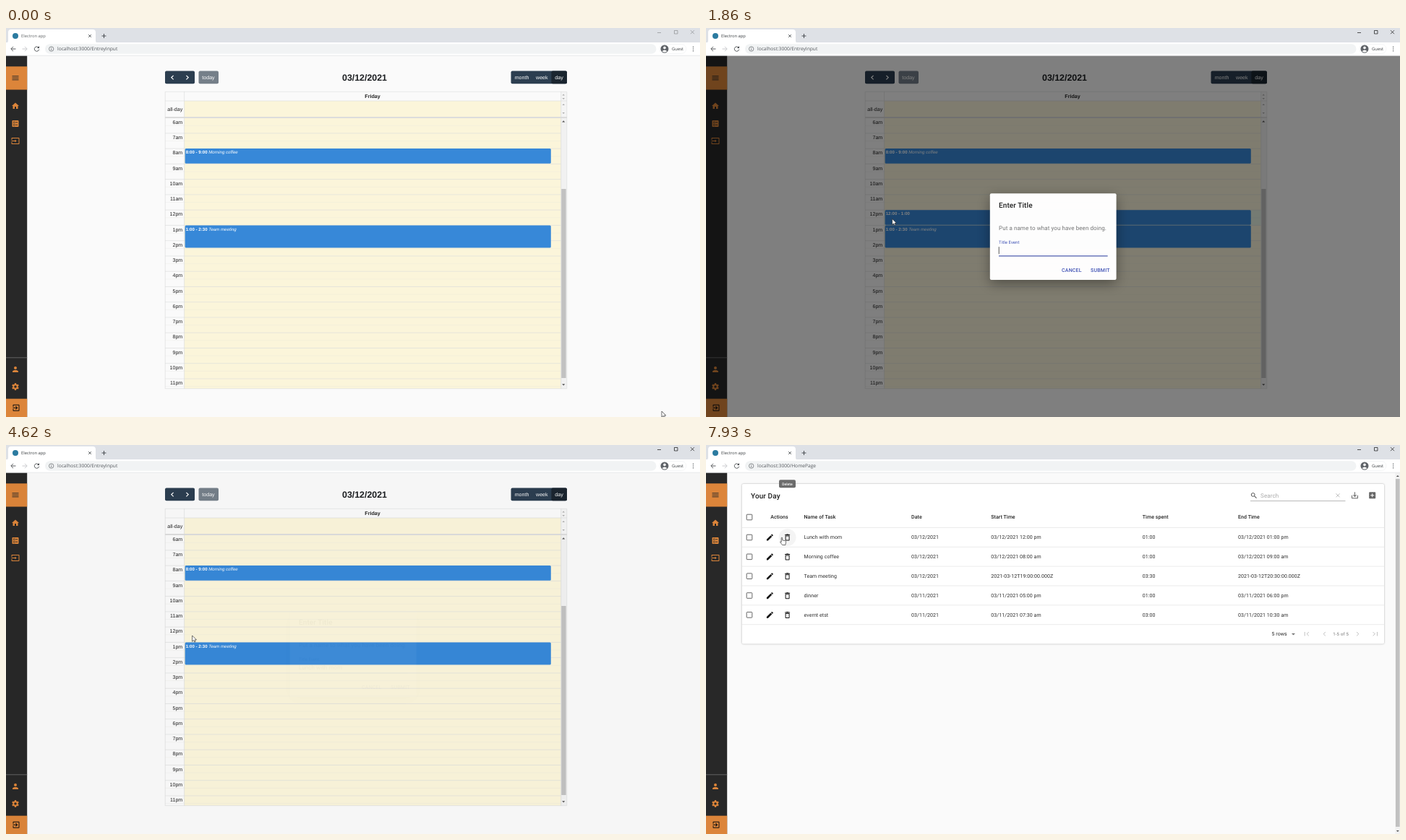
An HTML page that plays this animation: 960x539 px, repeating every 8 s.

```html
<!DOCTYPE html>
<html lang="en">
<head>
<meta charset="utf-8">
<title>Electron app</title>
<style>
html, body { margin: 0; width: 100%; height: 100%; overflow: hidden; background: #fafafa; }
svg { display: block; width: 100%; height: 100%; }
text { text-rendering: geometricPrecision; }
.ui { font-family: "Open Sans", "Noto Sans", sans-serif; }
.cal { font-family: "Liberation Sans", Arial, sans-serif; }
.mui { font-family: Roboto, sans-serif; letter-spacing: .0105em; }
.med { font-weight: 500; }
.bold { font-weight: 700; }
.btn { letter-spacing: .0286em; }
.cap { letter-spacing: .0333em; }
.paper { filter: drop-shadow(0 .8px .9px rgba(0,0,0,.32)); }
.modal { filter: drop-shadow(0 5px 9px rgba(0,0,0,.38)); }
</style>
</head>
<body>
<svg id="stage" viewBox="0 0 960 539" preserveAspectRatio="none"></svg>
<script>
const LOOP = 8000;
const DARK = '#212121', GREY = '#757575', PALE = '#bdbdbd', ORANGE = '#dc853a', INDIGO = '#3f51b5';

const ICONS = {
  menu: 'M3 18h18v-2H3v2zm0-5h18v-2H3v2zm0-7v2h18V6H3z',
  home: 'M10 20v-6h4v6h5v-8h3L12 3 2 12h3v8z',
  ballot: 'M13 9.5h5v-2h-5v2zm0 7h5v-2h-5v2zm6 4.5H5c-1.1 0-2-.9-2-2V5c0-1.1.9-2 2-2h14c1.1 0 2 .9 2 2v14c0 1.1-.9 2-2 2zM6 11h5V6H6v5zm1-4h3v3H7V7zM6 18h5v-5H6v5zm1-4h3v3H7v-3z',
  input: 'M21 3H3c-1.1 0-2 .9-2 2v4h2V5h18v14H3v-4H1v4c0 1.1.9 2 2 2h18c1.1 0 2-.9 2-2V5c0-1.1-.9-2-2-2zM11 16l4-4-4-4v3H1v2h10v3z',
  person: 'M12 12a4 4 0 1 0 0-8 4 4 0 0 0 0 8zm0 2c-2.7 0-8 1.3-8 4v2h16v-2c0-2.7-5.3-4-8-4z',
  exit: 'M10.1 15.6L11.5 17l5-5-5-5-1.4 1.4L12.7 11H3v2h9.7l-2.6 2.6zM19 3H5c-1.1 0-2 .9-2 2v4h2V5h14v14H5v-4H3v4c0 1.1.9 2 2 2h14c1.1 0 2-.9 2-2V5c0-1.1-.9-2-2-2z',
  edit: 'M3 17.2V21h3.8L17.8 9.9l-3.7-3.7L3 17.2zM20.7 7c.4-.4.4-1 0-1.4l-2.3-2.3c-.4-.4-1-.4-1.4 0l-1.9 1.8 3.8 3.8L20.7 7z',
  trash: 'M6 19c0 1.1.9 2 2 2h8c1.1 0 2-.9 2-2V7H6v12zM8 9h8v10H8V9zm7.5-5l-1-1h-5l-1 1H5v2h14V4z',
  save: 'M19 12v7H5v-7H3v7c0 1.1.9 2 2 2h14c1.1 0 2-.9 2-2v-7h-2zm-6 .7l2.6-2.6L17 11.5l-5 5-5-5 1.4-1.4 2.6 2.6V3h2z',
  add: 'M19 3H5c-1.1 0-2 .9-2 2v14c0 1.1.9 2 2 2h14c1.1 0 2-.9 2-2V5c0-1.1-.9-2-2-2zm-2 10h-4v4h-2v-4H7v-2h4V7h2v4h4v2z'
};

// markup helpers; text and icons are placed by their vertical centre
const rect = (x, y, r, b, fill, rx = 0, more = '') =>
  `<rect x="${x}" y="${y}" width="${r - x}" height="${b - y}" rx="${rx}" fill="${fill}" ${more}/>`;
const text = (x, y, s, size, cls, fill = DARK, more = '') =>
  `<text x="${x}" y="${y + size * .36}" font-size="${size}" class="${cls}" fill="${fill}" ${more}>${s}</text>`;
const path = (d, color, w = 1, more = '') =>
  `<path d="${d}" fill="none" stroke="${color}" stroke-width="${w}" ${more}/>`;
const shape = (d, fill) => `<path d="${d}" fill="${fill}"/>`;
const circle = (x, y, r, fill, more = '') => `<circle cx="${x}" cy="${y}" r="${r}" fill="${fill}" ${more}/>`;
const icon = (name, x, y, fill, s = .5) =>
  `<path transform="translate(${x - 12 * s} ${y - 12 * s}) scale(${s})" fill="${fill}" fill-rule="evenodd" d="${ICONS[name]}"/>`;
const group = (id, body, more = '') => `<g id="${id}" ${more}>${body}</g>`;
const hline = (x, r, y, color, w = .6, more = '') => path(`M${x} ${y}H${r}`, color, w, more);
const vline = (x, y, b, color, w = .6) => path(`M${x} ${y}V${b}`, color, w);
const cross = (x, y, r, color, w) => path(`M${x - r} ${y - r}l${2 * r} ${2 * r}m0 ${-2 * r}l${-2 * r} ${2 * r}`, color, w);
const tri = (x, y, w, h, fill) => shape(`M${x - w} ${y - h / 2}h${2 * w}l${-w} ${h}z`, fill);
const chevron = (x, y, r, dir, color, w) => path(`M${x - dir * r / 2} ${y - r}l${dir * r} ${r}l${-dir * r} ${r}`, color, w);
const MID = 'text-anchor="middle"', END = 'text-anchor="end"';

function browser() {
  return rect(0, 0, 960, 20.5, '#dee1e6') +
    shape('M0 20.5q3 0 3-3V6q0-4 4-4H120q4 0 4 4v11.500q0 3 3 3z', '#fff') +
    circle(13, 11, 4, '#2b7ba0') + cross(116, 11, 1.9, '#3c4043', .8) +
    path('M132.500 11h6m-3-3v6', '#3c4043', .9) +
    group('title', text(21, 11, 'Electron app', 5.8, 'ui', '#3c4043')) +
    group('wbtns', path('M901 6.500h5M924.500 3.500h4.500v4.500h-4.500z', '#111', .7) + cross(949.5, 5.7, 2.5, '#111', .7)) +
    rect(0, 20, 960, 38.2, '#fff') + hline(0, 960, 38.2, '#dadce0') +
    path('M13.500 29H7m3-3.200L6.800 29l3.200 3.200', '#4a4d51', .9) +
    path('M22.500 29H29m-3-3.200l3.200 3.200-3.200 3.200', '#c4c6c9', .9) +
    path('M45 27a3.200 3.200 0 1 0 .7 2.600', '#4a4d51', .9) + shape('M46 25v3h-3z', '#4a4d51') +
    rect(54, 22.3, 899.5, 35.7, '#f1f3f4', 6.7) +
    circle(62.7, 29, 3.2, 'none', 'stroke="#5f6368" stroke-width=".7"') +
    path('M62.700 28.500v2.300m0-4v.8', '#5f6368', .8) +
    text(71, 29, '', 6.65, 'ui', '#55595e', 'id="url"') +
    rect(904, 22.5, 941, 35.5, '#fff', 6.5, 'stroke="#eceef0" stroke-width=".6"') +
    circle(911, 29, 5.5, '#5f6368') + circle(911, 27.4, 1.8, '#fff') + shape('M907.500 32.200q3.500-3.600 7 0q-3.500 2.500-7 0z', '#fff') +
    text(921, 29, 'Guest', 5.9, 'ui', '#3c4043') +
    [26.3, 29, 31.7].map(y => circle(950.6, y, .75, '#5f6368')).join('');
}

function gear(x, y) {
  let s = circle(x, y, 2.7, 'none', `stroke="${ORANGE}" stroke-width="1.9"`);
  for (let i = 0; i < 6; i++)
    s += `<rect x="${x - 1.1}" y="${y - 4.9}" width="2.2" height="2" fill="${ORANGE}" transform="rotate(${i * 60} ${x} ${y})"/>`;
  return s;
}

function sidebar() {
  return rect(0, 38.4, 29.2, 539, '#282828') + rect(0, 53.3, 29.2, 85.5, ORANGE) +
    icon('menu', 13, 69.3, '#2b2b2b') +
    [['home', 108], ['ballot', 132.4], ['input', 156.6], ['person', 473]].map(([n, y]) => icon(n, 13, y, ORANGE)).join('') +
    gear(13, 497) + hline(0, 29.2, 456.8, '#6a6a6a', .9) +
    rect(0, 513.7, 29.2, 539, ORANGE) + icon('exit', 14, 526.3, '#111');
}

// calendar geometry
const hourY = h => 124.6 + (h - 6) * 21.26;
const label = h => (h > 12 ? h - 12 : h) + (h < 12 ? 'am' : 'pm');
const eventBox = (id, from, to, time, name) => group(id,
  rect(247.6, hourY(from), 753.8, hourY(to) - .7, '#3788d8', 1.5) +
  text(248.7, hourY(from) + 4.9, `<tspan font-weight="700">${time}</tspan> <tspan font-style="italic">${name}</tspan>`, 6.12, 'cal', '#fff'));

function calendar() {
  const line = '#d9dadb', today = '#fbf5da', navy = '#2c3e50';
  let s = rect(29.2, 38.5, 960, 539, '#fafafa') +
    rect(220, 59.5, 261, 77.3, navy, 2) + chevron(230.2, 68.6, 2.8, -1, '#fff', 1.2) + chevron(250.8, 68.6, 2.8, 1, '#fff', 1.2) +
    rect(266.5, 59.5, 294, 77.3, '#757f89', 2) + text(280, 68.5, 'today', 7.1, 'cal', '#fff', MID) +
    text(496, 68.6, '03/12/2021', 12.4, 'cal bold', '#1c1f22', MID) +
    rect(698.5, 59.5, 776, 77.3, navy, 2) + rect(754.4, 59.5, 776, 77.3, '#1a252f', 2) +
    [['month', 713.5], ['week', 741.3], ['day', 765]].map(([w, x]) => text(x, 68.5, w, 7.1, 'cal', '#fff', MID)).join('') +
    text(507, 94.7, 'Friday', 7.1, 'cal bold', DARK, MID) +
    rect(246.6, 101, 767.7, 123.2, today) + rect(246.6, 125, 767.7, 499.7, today) +
    text(244.2, 112.3, 'all-day', 7.1, 'cal', DARK, END);
  for (let h = 6; h < 24; h++) {
    s += text(244.2, hourY(h) + 5.6, label(h), 7.05, 'cal', DARK, END);
    if (h > 6) s += hline(220, 767.7, hourY(h), line);
    s += hline(220, 767.7, hourY(h + .5), '#dedfd9', .5, 'stroke-dasharray=".5 .5"');
  }
  s += rect(220, 123, 776, 125, '#dcdcdc') +
    rect(767.9, 88.3, 775.5, 123, '#f4f4f4') + rect(767.9, 125, 775.5, 499.6, '#f1f1f1') + rect(768.2, 223, 774.6, 485, '#c1c1c1') +
    tri(771.2, 92.5, 1.7, -1.8, '#aaa') + tri(771.2, 98, 1.7, 1.8, '#aaa') +
    tri(771.2, 106, 1.7, -1.8, '#aaa') + tri(771.2, 118, 1.7, 1.8, '#aaa') +
    tri(771.2, 129.3, 2, -2.2, '#505050') + tri(771.2, 494.3, 2, 2.2, '#505050') +
    path('M220.200 88.300H775.700V499.700H220.200zM220 101H776M246.600 88V500M767.700 88V500', line, .6) +
    group('shade', '<rect id="shadeBox" x="246.6" y="252.2" width="521" fill="#bce8f1" fill-opacity=".32"/>') +
    eventBox('coffee', 8, 9, '8:00 - 9:00', 'Morning coffee') +
    eventBox('half', 12, 12.5, '12:00 - 12:30', '') +
    eventBox('pick', 12, 13, '12:00 - 1:00', '') +
    eventBox('lunch', 12, 13, '12:00 - 1:00', 'Lunch with mom') +
    eventBox('team', 13, 14.5, '1:00 - 2:30', 'Team meeting');
  return s;
}

const checkbox = y => rect(56.2, y - 3.8, 63.8, y + 3.8, 'none', .7, 'stroke="#666" stroke-width="1"');

// the task table: dx and dy shift the controls when a scrollbar takes room
function table(id, right, bottom, cols, body, count) {
  const dx = right - 946.5, fy = bottom - 14;
  const names = ['Actions', 'Name of Task', 'Date', 'Start Time', 'Time spent', 'End Time'];
  return group(id,
    rect(49.8, 54, right, bottom, '#fff', 2, 'class="paper"') +
    text(62, 70, 'Your Day', 10, 'mui med') +
    circle(765.2 + dx, 68.9, 2.4, 'none', 'stroke="#555" stroke-width="1"') + path(`M${767 + dx} 70.700l3 3`, '#555', 1.1) +
    text(775.6 + dx, 69.8, 'Search', 8, 'mui', '#a9a9a9') + hline(761.5 + dx, 893 + dx, 77.5, '#8c8c8c', .6) +
    cross(882.5 + dx, 69.8, 2.5, '#b5b5b5', .9) +
    icon('save', 906 + dx, 69.8, '#666') + icon('add', 930.2 + dx, 69.8, '#666') +
    checkbox(100) + cols.map((x, i) => text(x, 99.8, names[i], 7, 'mui med')).join('') +
    hline(49.8, right, 114.5, '#dedede') + body +
    text(791 + dx, fy - .4, '5 rows', 7, 'mui') + tri(821 + dx, fy + .7, 2.5, 2.5, GREY) +
    vline(836.7 + dx, fy - 2.5, fy + 3.1, PALE, .9) + chevron(841 + dx, fy + .3, 2.6, -1, PALE, 1) +
    chevron(864 + dx, fy + .3, 2.6, -1, PALE, 1) + text(875.7 + dx, fy, count, 6, 'mui cap', GREY) +
    chevron(910 + dx, fy + .3, 2.6, 1, PALE, 1) +
    chevron(932.5 + dx, fy + .3, 2.6, 1, PALE, 1) + vline(937 + dx, fy - 2.5, fy + 3.1, PALE, .9));
}

const TASKS = [
  ['Lunch with mom', '03/12/2021', '03/12/2021 12:00 pm', '01:00', '03/12/2021 01:00 pm'],
  ['Morning coffee', '03/12/2021', '03/12/2021 08:00 am', '01:00', '03/12/2021 09:00 am'],
  ['Team meeting', '03/12/2021', '2021-03-12T19:00:00.000Z', '03:30', '2021-03-12T20:30:00.000Z'],
  ['dinner', '03/11/2021', '03/11/2021 05:00 pm', '01:00', '03/11/2021 06:00 pm'],
  ['evernt etst', '03/11/2021', '03/11/2021 07:30 am', '03:00', '03/11/2021 10:30 am']
];

function home() {
  const cols = [89.2, 135.5, 284, 394.2, 603.8, 736];
  const rows = circle(112.6, 128, 12, '#000', 'id="binHover"') + TASKS.map((task, i) => {
    const y = 127.8 + i * 26.85;
    return checkbox(y + .2) + icon('edit', 88.4, y + .3, '#161616') + icon('trash', 112.6, y + .3, '#161616') +
      task.map((s, k) => text(cols[k + 1], y - .2, s, 7, 'mui', '#2c2c2c')).join('') +
      hline(49.8, 938, y + 13.5, '#dedede');
  }).join('');
  return rect(29.2, 38.5, 960, 539, '#fafafa') +
    table('empty', 946.5, 265.5, [84.8, 127.3, 292.5, 458, 623.3, 789],
      text(498, 176, 'No records to display', 7, 'mui', '#2c2c2c', MID) + hline(49.8, 946.5, 238.5, '#dedede'), '0-0 of 0') +
    group('full', table('rows', 938, 275.5, cols, rows, '1-5 of 5') +
      rect(953.3, 38.5, 960, 539, '#f1f1f1') + rect(954, 47, 959.6, 529, '#c1c1c1') +
      tri(956.8, 43, 2, -2.2, '#505050') + tri(956.8, 535, 2, 2.2, '#505050')) +
    group('tip', rect(101, 48.2, 124, 59.3, '#616161', 2, 'fill-opacity=".93"') + text(112.5, 53.7, 'Delete', 5, 'mui med', '#fff', MID));
}

function dialog() {
  return group('veil', rect(0, 38.4, 960, 539, '#000', 0, 'fill-opacity=".5"')) +
    group('dialog', rect(392.8, 229.2, 567.6, 349, '#fff', 2, 'class="modal"') +
      text(405, 245.2, 'Enter Title', 10, 'mui med') +
      text(405, 277.3, 'Put a name to what you have been doing.', 8, 'mui', GREY) +
      text(405, 297.3, 'Title Event', 6, 'mui', INDIGO, 'id="label"') +
      text(405, 308.2, '', 8, 'mui', DARK, 'id="typed"') +
      hline(405, 555.7, 316, '#8d8d8d', .5) +
      '<path id="under" stroke-width="1" stroke="' + INDIGO + '"/>' +
      '<rect id="caret" y="303.2" width=".7" height="10" fill="#111"/>' +
      text(492, 335.3, 'CANCEL', 7, 'mui med btn', INDIGO) + text(532, 335.3, 'SUBMIT', 7, 'mui med btn', INDIGO));
}

const stage = document.getElementById('stage');
stage.innerHTML = group('calendar', calendar()) + group('home', home()) + sidebar() +
  circle(13, 108, 12.8, '#003575', 'id="ripple"') + dialog() + browser() +
  group('status', shape('M0 528.800H317q2 0 2 2V539H0z', '#dee1e6') + text(1, 534.2, 'localhost:3000/HomePage', 5.75, 'ui', '#55595e')) +
  group('cursor', group('arrow', '<path d="M0 0V8.200L2 6.400 3.200 9 4.500 8.400 3.400 5.900H5.900z" fill="#fff" stroke="#222" stroke-width=".65"/>') +
    group('hand', '<path transform="translate(-2.600 0)" d="M2 1q.7-1.100 1.500 0v3.300l4 .9q1.100.4.9 1.700l-.8 4.100H3.500L.5 7.200q-.3-1.300 1-.8l.5.500z" fill="#fff" stroke="#222" stroke-width=".65"/>'));

const el = {};
stage.querySelectorAll('[id]').forEach(n => el[n.id] = n);
const show = (id, on) => el[id].style.display = on ? '' : 'none';
const fade = (id, v) => { el[id].style.opacity = v; show(id, v > 0); };
const between = (t, a, b) => t >= a && t < b;
const ramp = (t, a, b) => Math.min(1, Math.max(0, (t - a) / (b - a)));

// cubic-bezier(.4, 0, .2, 1)
function ease(p) {
  let lo = 0, hi = 1, u = p;
  for (let i = 0; i < 18; i++) {
    u = (lo + hi) / 2;
    const x = 1.2 * u * (1 - u) ** 2 + .6 * u * u * (1 - u) + u ** 3;
    if (x < p) lo = u; else hi = u;
  }
  return 3 * u * u * (1 - u) + u ** 3;
}

// time, x, y
const PATH = [
  [0, 907, 531], [50, 907, 531], [220, 401, 315], [350, 401, 315], [600, 318, 276], [910, 259.5, 252.5],
  [1200, 259.5, 252.5], [1450, 257.6, 264.5], [4900, 257.6, 264], [5010, 253, 257], [5130, 253, 257], [5240, 250, 251],
  [5420, 250, 251], [5690, 128, 172.5], [5950, 46, 126], [6230, 17.2, 111],
  [6730, 17.2, 111], [7050, 48, 119], [7550, 104.8, 127.6], [LOOP, 104.8, 127.6]
];
function cursorAt(t) {
  const i = Math.max(1, PATH.findIndex(p => p[0] > t));
  const [a, x, y] = PATH[i - 1], [b, X, Y] = PATH[i], k = ramp(t, a, b);
  return [x + (X - x) * k, y + (Y - y) * k];
}

// time, letters typed
const KEYS = [[0, 0], [2550, 1], [2710, 2], [2950, 3], [3100, 4], [3180, 5], [3260, 6], [3420, 7], [3500, 8],
  [3590, 10], [3670, 11], [3920, 12], [4000, 13], [4160, 14]];
const PHRASE = 'Lunch with mom'.replace(/ /g, '\u00a0');

function draw(t) {
  const atHome = t >= 6310, loaded = t >= 6780, focused = t >= 1140;
  show('calendar', !atHome);
  show('home', atHome);
  show('empty', !loaded);
  show('full', loaded);
  el.url.textContent = 'localhost:3000/' + (atHome ? 'HomePage' : 'EntreyInput');
  el.wbtns.style.opacity = focused ? 1 : .4;
  el.title.style.opacity = focused ? 1 : .8;

  show('half', between(t, 1140, 1300));
  show('pick', between(t, 1300, 4470));
  show('shade', between(t, 1140, 4470));
  el.shadeBox.setAttribute('height', t < 1300 ? 10.6 : 21.2);
  show('lunch', t >= 4930);

  const alpha = t < 3000 ? ease(ramp(t, 1665, 1890)) : 1 - ease(ramp(t, 4470, 4665));
  fade('veil', alpha);
  fade('dialog', alpha);
  if (alpha > 0) {
    const key = KEYS.filter(k => k[0] <= t).pop();
    el.typed.textContent = PHRASE.slice(0, key[1]);
    el.caret.setAttribute('x', 404.8 + (key[1] ? el.typed.getComputedTextLength() : 0));
    show('caret', t < 2240 || between(t, 2550, 4470));
    const half = 75.3 * (t < 3000 ? ramp(t, 1690, 1850) : 1 - ramp(t, 4470, 4572));
    el.under.setAttribute('d', `M${480.3 - half} 315.900h${2 * half}`);
    el.label.setAttribute('fill', t < 4470 ? INDIGO : GREY);
  }

  const grow = ramp(t, 6230, 6420);
  el.ripple.setAttribute('r', 8 + 4.8 * grow);
  fade('ripple', .3 * grow * (1 - ramp(t, 6850, 7000)));
  show('status', between(t, 6310, 7080));
  fade('binHover', .045 * ramp(t, 7550, 7700));
  fade('tip', ease(ramp(t, 7620, 7820)));

  const [x, y] = cursorAt(t);
  const hand = between(t, 6150, 6900) || t >= 7480;
  show('hand', hand);
  show('arrow', !hand);
  el.cursor.setAttribute('transform', `translate(${x.toFixed(2)} ${y.toFixed(2)})`);
}

function tick() {
  draw(performance.now() % LOOP);
  requestAnimationFrame(tick);
}
tick();
</script>
</body>
</html>
```
